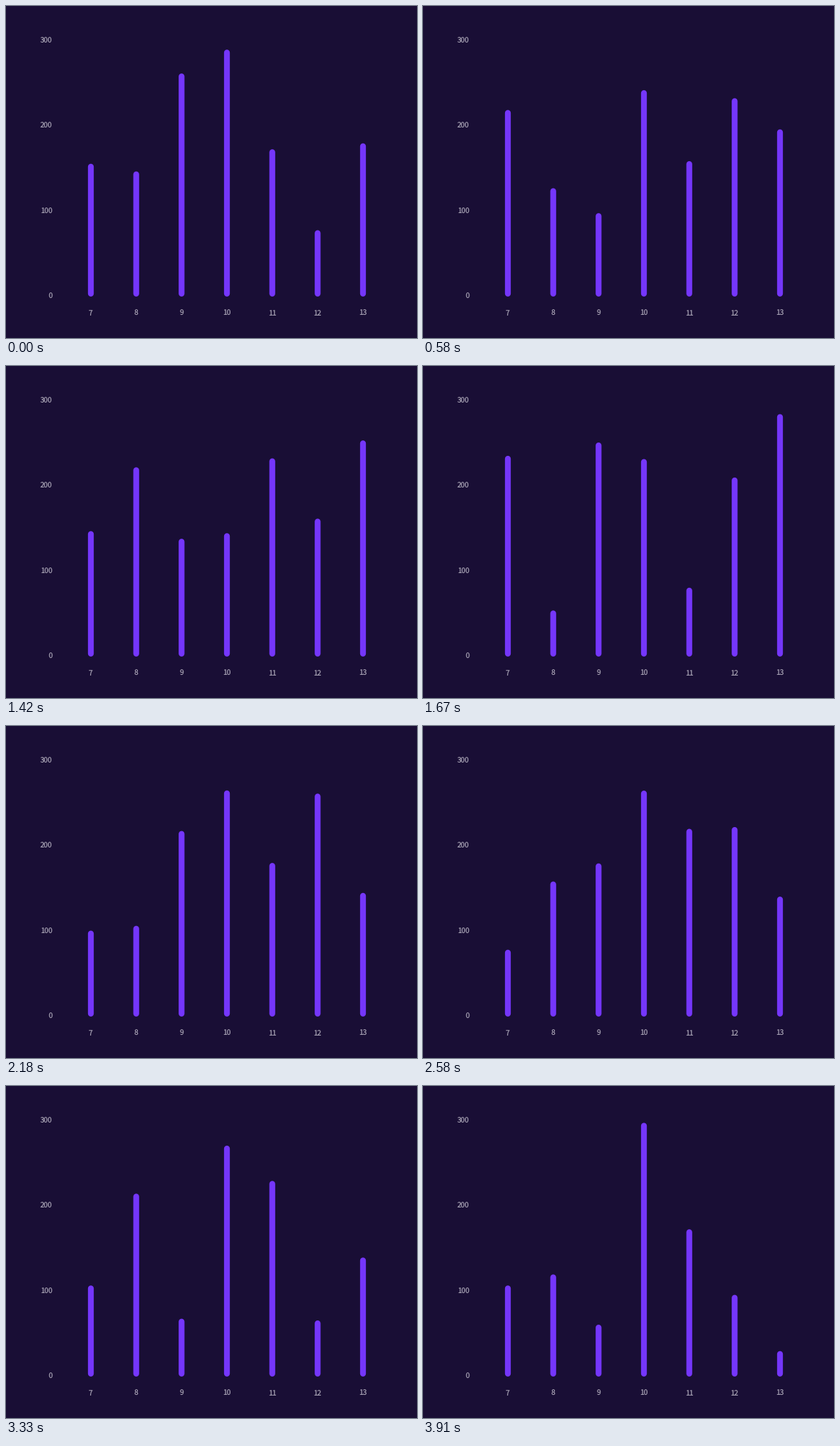
These frames come from a looping animation (586x473 px, 3.94 s). A matplotlib script:

```python
import matplotlib.pyplot as plt
import numpy as np
from matplotlib.animation import FuncAnimation

W, H, DPI = 586, 473, 100
PX = 72 / DPI
LOOP, STEP = 3940, 10
BG, BAR, TEXT = "#190e35", "#7536fb", "#a5a0b2"

ZERO, UNIT = 414, 364 / 300     # baseline and pixels per chart unit
LEFT, GAP = 121, 194 / 3        # first bar and bar spacing
WIDTH = 8.3
DURATION = 550

# the chart's data: one row per week, and when each new week moves in
WEEKS = np.array([
    [156, 147, 262, 290, 173, 78, 180],
    [233, 123, 62, 232, 156, 267, 200],
    [118, 277, 104, 116, 282, 145, 245],
    [248, 31, 267, 244, 60, 217, 289],
    [71, 122, 208, 270, 205, 271, 116],
    [107, 297, 74, 248, 279, 40, 235],
    [107, 120, 61, 298, 173, 96, 30],
])
STARTS = [195, 740, 1240, 1790, 2402, 3065]
ENDS = STARTS[1:] + [LOOP]


def ease(p):
    p = min(max(p, 0), 1)
    return 2 * p * p if p < 0.5 else 1 - 2 * (1 - p) ** 2


def values_at(t):
    # a new move may cut the running one short
    now = WEEKS[0]
    for start, end, goal in zip(STARTS, ENDS, WEEKS[1:]):
        now = now + (goal - now) * ease((min(t, end) - start) / DURATION)
    return now


plt.rcParams["text.hinting"] = "none"
fig = plt.figure(figsize=(W / DPI, H / DPI), dpi=DPI, facecolor=BG)
ax = fig.add_axes([0, 0, 1, 1])
ax.set_xlim(0, W)
ax.set_ylim(H, 0)
ax.axis("off")


def label(x, y, s, ha):
    ax.text(x, y, s, ha=ha, va="baseline", color=TEXT,
            family="Noto Sans CJK JP", size=10.3 * PX)


for v in range(0, 301, 100):
    label(66, ZERO + 3 - v * UNIT, str(v), "right")

bars = []
for i in range(7):
    x = LEFT + i * GAP
    label(x, 441, str(7 + i), "center")
    line, = ax.plot([x, x], [ZERO, ZERO], color=BAR, lw=WIDTH * PX,
                    solid_capstyle="round", snap=False)
    bars.append(line)


def update(n):
    r = WIDTH / 2
    for line, v in zip(bars, values_at(n * STEP)):
        line.set_ydata([ZERO - r, ZERO - v * UNIT + r])
    return bars


anim = FuncAnimation(fig, update, frames=LOOP // STEP, interval=STEP,
                     repeat=True, repeat_delay=0, blit=False)
plt.show()
```
